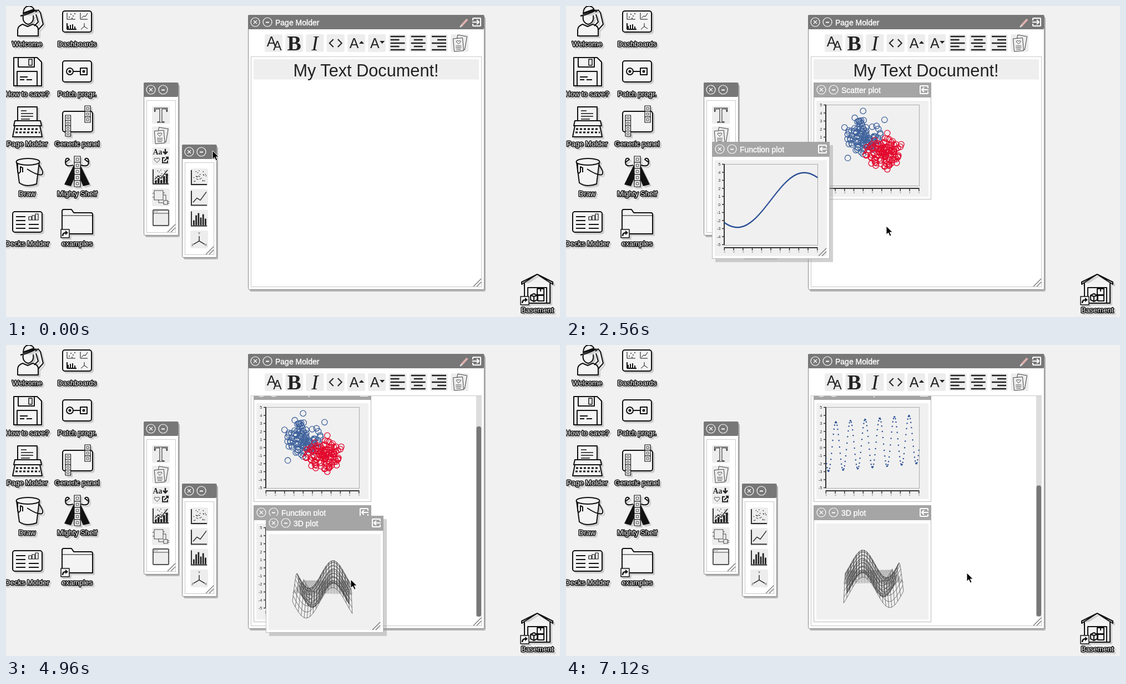
Write an HTML page that moves like this. It is 998 px wide and 561 px high and loops after 7200 ms.

```html
<!DOCTYPE html>
<html lang="en">
<head>
<meta charset="utf-8">
<title>Desktop</title>
<style>
html, body { margin: 0; width: 100%; height: 100%; overflow: hidden; background: #f1f1f1; }
svg { display: block; width: 998px; height: 561px; font-family: "Liberation Sans", Arial, sans-serif; }
.serif { font-family: "Liberation Serif", Times, serif; }
.desk { fill: none; stroke: #111; stroke-width: 2; stroke-linejoin: round; filter: drop-shadow(3px 3px 0 #ccc); }
.desk .w { fill: #f4f4f4; }
.desk .k { fill: #111; stroke: none; }
.label { font-size: 13px; fill: #fff; stroke: #111; stroke-width: 3px; stroke-linejoin: round; paint-order: stroke; text-anchor: middle; filter: drop-shadow(3px 3px 0 #d2d2d2); }
.title { font-size: 14px; fill: #fff; stroke: #fff; stroke-width: .35px; }
.ic { fill: none; stroke: #222; stroke-width: 1.4; }
.ic .k { fill: #222; stroke: none; }
.ic .t { stroke-width: .8; }
.btn { fill: none; stroke: #fff; stroke-width: 1.2; }
</style>
</head>
<body>
<svg id="stage" viewBox="0 0 998 561"></svg>
<script>
const LOOP = 7200, STEP = 80;
const $ = id => document.getElementById(id);
const range = (n, f) => Array.from({ length: n }, (_, i) => f(i)).join('');
const rect = (x, y, w, h, a = '') => `<rect x="${x}" y="${y}" width="${w}" height="${h}" ${a}/>`;
const path = (d, a = '') => `<path d="${d}" ${a}/>`;
const circle = (x, y, r, a = '') => `<circle cx="${x}" cy="${y}" r="${r}" ${a}/>`;
const text = (x, y, s, a = '') => `<text x="${x}" y="${y}" ${a}>${s}</text>`;
const at = (x, y, s, a = '') => `<g transform="translate(${x} ${y})" ${a}>${s}</g>`;

function random(seed) {
  return () => {
    seed = seed + 0x6D2B79F5 | 0;
    let v = Math.imul(seed ^ seed >>> 15, 1 | seed);
    v = v + Math.imul(v ^ v >>> 7, 61 | v) ^ v;
    return ((v ^ v >>> 14) >>> 0) / 4294967296;
  };
}

/* ---------- desktop icons ---------- */
const badge = (x, y) => rect(x, y, 15, 15, 'class="w" stroke-width="1.5"') +
  path(`M${x + 3} ${y + 12}q0-6 6-6`, 'stroke-width="2.4"') +
  path(`M${x + 8} ${y + 2}l5 4-5 4z`, 'class="k"');
const strip = (x, y, n, s) => range(n, i => rect(x, y + i * s, s, s, 'class="w" stroke-width="1.2"') +
  rect(x + s * .3, y + i * s + s * .3, s * .4, s * .4, 'stroke-width=".8"'));
const screen = (x, y, w, h) => rect(x, y, w, h, 'class="w" rx="4"');

const desktop = [
  [38, 73, 'Welcome', path('M21 54V44q0-8 9-11l9 4 9-4q10 2 10 10v11z', 'class="w"') +
    path('M31 18q-2 12 9 15 11-3 9-16', 'class="w"') +
    path('M31 14Q31 2 40 0q9 0 11 8z', 'class="w"') + path('M26 18Q40 15 55 7M31 13l20-7', 'stroke-width="2.500"') +
    path('M53 11l5-4 4 5 5 21-9 10M54 15l4 14-7 7')],
  [128, 73, 'Dashboards', screen(102, 9, 52, 38) + path('M112 42v-6M116 42V34M120 42v-9M124 42v-5M110 42h17M110 31v11', 'stroke-width="2"') +
    path('M134 12v12h13M136 22l4-4 3 1 4-6M141 31v6l-6 5M141 37l6 4M110 12v12h15', 'stroke-width="1"') +
    [[114, 20], [117, 15], [121, 18], [124, 14], [119, 22]].map(p => circle(...p, .9, 'class="k"')).join('')],
  [38, 163, 'How to save?', path('M14 93h42l8 8v43H14z', 'class="w"') + rect(22, 93, 29, 17) +
    rect(41, 96, 6, 11, 'stroke-width="1.5"') + rect(20, 118, 36, 26) + path('M25 128h14M25 133h8M37 133h10')],
  [128, 163, 'Patch progr.', screen(102, 99, 52, 38) + circle(115, 118, 6) + circle(115, 118, 1.5) + path('M121 118h13') + rect(134, 112, 12, 12) + circle(140, 118, 1.5)],
  [38, 253, 'Page Molder', rect(21, 182, 35, 27, 'class="w"') + path('M27 189h10M27 194h22M27 199h22M27 204h16', 'stroke-width="1.5"') +
    path('M16 207h46l2 9H14zM16 216h45l4 20H12z', 'class="w"') + path('M18 222h42M17 228h44', 'stroke-dasharray="4 3" stroke-width="3"')],
  [128, 253, 'Generic panel', screen(102, 190, 54, 37) + strip(107, 197, 4, 9.5) + strip(142, 180, 3, 10)],
  [38, 343, 'Draw', path('M19 281l5 38q13 9 31 2l5-40', 'class="w"') + '<ellipse cx="39.500" cy="281" rx="21" ry="6" class="w"/>' +
    path('M21 284v15q2 5 5 0v-9l4 2v8') + path('M59 286q10 14 6 18-7 3-27-10')],
  [128, 343, 'Mighty Shelf', path('M122 287l-17 35 12 3 11-26 11 26 12-3-17-35z', 'class="k"') +
    path('M121 287q-14 4-14-5l7-5q-2-4-6-1-2 6 0 9M135 287q14 4 14-5l-7-5q2-4 6-1 2 6 0 9') + strip(123, 271, 5, 11)],
  [38, 433, 'Decks Molder', screen(12, 371, 53, 37) + path('M18 380h17M18 387h17M18 394h17M18 401h17M41 394h18M41 401h18', 'stroke-width="1.800"') +
    rect(41, 380, 5, 6, 'stroke-width="1.2"') + rect(47, 378, 5, 8, 'stroke-width="1.2"') + rect(53, 375, 5, 11, 'stroke-width="1.2"')],
  [128, 433, 'examples', path('M101 411V370q0-3 3-3h14l4 6h31q3 0 3 3v35z', 'class="w"') + path('M101 378h55', 'stroke-width="1"') + badge(99, 403)],
  [957, 553, 'Basement', path('M934 500v36h46v-36', 'class="w"') + path('M929 502l28-18 28 18v-4l-28-14-28 14z', 'class="w"') +
    path('M940 536v-28h34v28') + rect(957, 510, 12, 11) + path('M963 510v5M945 522l6-3 6 3v8l-6 3-6-3zM951 533v-9l6-2M951 524l-6-2') + rect(958, 522, 11, 10) + badge(927, 524)]
];

/* ---------- windows ---------- */
const buttons = (x, y) => at(x, y, circle(13, 13, 8) + path('M10 10l6 6M16 10l-6 6') + circle(35, 13, 8) + path('M32 13.500h6', 'stroke-width="2"'), 'class="btn"');
const grip = (x, y) => path(`M${x - 15} ${y}l14-14M${x - 9} ${y}l8-8`, 'stroke="#777" stroke-width="1.4"');
const frame = (x, y, w, h, top) =>
  rect(x + 3, y + 4, w, h, 'rx="3" fill="#b4b4b4"') +
  rect(x + .5, y + .5, w, h, 'rx="2" fill="#fff" stroke="#888"') +
  rect(x, y, w, 26, 'rx="2" fill="#777"') + buttons(x, y) +
  rect(x + 5.5, y + top + .5, w - 10, h - top - 5, 'fill="none" stroke="#c9c9c9"') + grip(x + w - 4, y + h - 5);

const heart = (x, y, s) => path(`M${x} ${y + 4 * s}l${-4 * s} ${-4 * s}q${-s} ${-4 * s} ${4 * s} ${-2 * s}q${5 * s} ${-2 * s} ${4 * s} ${2 * s}z`, 'class="t"');
const cards = rect(-6, -14, 17, 24, 'class="t" transform="rotate(10)"') + rect(-11, -9, 17, 23, 'class="t" fill="#eee" transform="rotate(-5)"') +
  heart(-2, -2, .9) + path('M-7 5h10M-7 8h10M-6 11h8', 'class="t"');
const axes = path('M-14-13V13H14', 'stroke-width="1.800"');
const dots = (() => {
  const r = random(4);
  return range(24, () => circle((r() * 24 - 11).toFixed(1), (r() * 20 - 12).toFixed(1), .8, 'class="k"'));
})();
const bars = (list, w) => list.map((h, i) => rect(-11 + i * w, 12 - h, w - 1.4, h, 'class="k"')).join('');
const serif = (s, size, x, y, a = '') => text(x, y, s, `class="serif k" font-size="${size}" text-anchor="middle" ${a}`);
const sans = (s, size, x, y) => text(x, y, s, `class="k" font-size="${size}" text-anchor="middle"`);
const align = shift => path([13, 8, 13, 8, 13].map((w, i) => {
  const x = shift * (13 - w);
  return `M${x - w} ${i * 6 - 12}h${2 * w}`;
}).join(''), 'stroke-width="2.4"');

const tools = [
  text(0, 13, 'T', 'class="serif" font-size="40" text-anchor="middle" fill="#fff" stroke-width="1.1"'),
  cards,
  serif('Aa', 14, -6, -3, 'font-weight="bold"') + path('M8-13v7M4-8l4 4 4-4', 'stroke-width="2.4"') + heart(-7, 7, 1.2) +
    path('M7 3H3v9h9V8M6 9l7-7M9 2h4v4', 'stroke-width="2"'),
  axes + bars([5, 9, 6, 13, 17], 5) + path('M-11 5l6-6 5 4 12-15') + dots,
  rect(-12, -12, 16, 17, 'class="t"') + rect(5, 6, 7, 7, 'class="t"') + path('M-4 5v5H5M4-4h5v10M-15-7h3M-15 0h3M4-8h3M12 8h3M12 11h3', 'class="t"'),
  rect(-14, -14, 28, 28, 'rx="1"') + path('M-14-8H14M-12-11h2M-8-11h2', 'class="t"')
];
const charts = [
  axes + dots,
  axes + path('M-11 8l7-8 6 4 11-15'),
  axes + bars([9, 18, 22, 14, 20, 12], 4.2),
  path('M0-6V3L-10 9M0 3L10 9') + sans('Y', 6, 0, -9) + sans('Z', 6, -12, 12) + sans('X', 6, 12, 12)
];
const styles = [
  sans('A', 25, -4, 6) + sans('A', 23, 7, 13),
  serif('B', 38, 0, 13, 'font-weight="bold"'),
  serif('I', 37, 0, 13, 'font-style="italic"'),
  path('M-4-7l-7 7 7 7M4-7l7 7-7 7', 'stroke-width="2"'),
  sans('A', 25, -4, 9) + path('M5 1l4.500-5 4.500 5z', 'class="k"'),
  sans('A', 25, -4, 9) + path('M5-4l4.500 5 4.500-5z', 'class="k"'),
  align(-1), align(0), align(1), cards
];
const tool = (x, y, s) => at(x, y, rect(-16, -16, 32, 32, 'rx="3" fill="#ededed" stroke="none"') + s, 'class="ic"');
const port = (x, y, dir) => at(x, y, path('M-7-3v-3q0-1 1-1H6q1 0 1 1V6q0 1-1 1H-6q-1 0-1-1V3', dir < 0 ? 'transform="scale(-1 1)"' : '') +
  path('M-8 0H3M0-4l4 4-4 4', dir < 0 ? 'transform="scale(-1 1)"' : ''), 'fill="none" stroke="#fff" stroke-width="2"');

/* ---------- plots: 212 x 211, origin at (106, 113), one unit is 16.75 x 14.5 ---------- */
const UX = 16.75, UY = 14.5, CX = 106, CY = 113;
const plotAxes = rect(22.5, 40.5, 168, 146, 'fill="none" stroke="#aaa"') +
  path('M22 40V186M22 191H190', 'stroke="#333" stroke-width="2"') +
  range(11, i => {
    const y = 40.5 + i * UY, x = 22.3 + i * UX;
    return path(`M18 ${y}h5M${x} 190v6`, 'stroke="#333" stroke-width="1.500"') +
      text(15.5, y + 2.5, 5 - i, 'font-size="7.500" text-anchor="end" fill="#333"') +
      text(x, 200, i - 5, 'font-size="4" text-anchor="middle" fill="#555"');
  });

const plotWindow = (i, title, body) =>
  `<g id="wrap${i}"><g id="plot${i}">` +
  `<g id="deco${i}">` + rect(6, 6, 212, 211, 'fill="#999" fill-opacity=".45"') + '</g>' +
  rect(.5, .5, 211, 210, 'fill="#fff" stroke="#bbb"') + rect(5, 33, 202, 173, 'fill="#f0f0f0"') +
  rect(0, 0, 212, 27, 'fill="#a5a5a5"') + buttons(1, 0) + text(50, 19, title, 'class="title"') + port(199, 13, -1) +
  body + `<g id="grip${i}">${grip(207, 206)}</g></g></g>`;

// One cloud of rings as a path; extra points are given in plot units.
function cloud(seed, mx, my, sx, sy, extra) {
  const r = random(seed), pts = extra.slice();
  while (pts.length < 110) {
    const m = Math.min(2.1, Math.sqrt(-2 * Math.log(r() + 1e-6))), a = r() * 2 * Math.PI;
    pts.push([mx + sx * m * Math.cos(a), my + sy * m * Math.sin(a)]);
  }
  return pts.map(([x, y]) => `M${(CX + x * UX - 5.2).toFixed(1)} ${(CY - y * UY).toFixed(1)}a5.2 5.2 0 1 0 10.400 0a5.2 5.2 0 1 0-10.400 0`).join('');
}
const scatter = [
  [cloud(11, -.85, .95, 1, .75, [[-4.4, 1.2], [1.55, 3], [-1.3, 3], [-2.9, -1.3], [-3.5, .7]]),
   cloud(23, 1, -.9, .85, .85, [[3, .3], [2.9, -1.5], [-.35, -3], [.5, -3]])],
  [cloud(37, -.9, 1, .85, 1, [[-1, 4.25], [1.3, 3.15], [-1.9, 3.4], [-2.65, -1.6], [-3, 2.2]]),
   cloud(53, 1.05, -.9, .85, .85, [[3.1, .1], [3, -.2], [1.6, 1.5], [1.6, -3], [2.6, -2.2]])]
];

const heading = rect(446, 96, 406, 36.5, 'fill="#eee"') + text(648.5, 126.5, 'My Text Document!', 'font-size="30.700" text-anchor="middle" fill="#222"');
$('stage').innerHTML =
  '<defs><clipPath id="page">' + rect(442, 92, 415, 414) + '</clipPath><clipPath id="area">' + rect(22, 40, 168.5, 147) + '</clipPath></defs>' +
  rect(0, 0, 998, 561, 'fill="#f1f1f1"') +
  desktop.map(([x, y, name, art]) => `<g class="desk">${art}</g>` + text(x, y, name, 'class="label"')).join('') +
  frame(436, 16, 425, 495, 75) + text(485, 34.5, 'Page Molder', 'class="title"') +
  path('M820 36l11-12', 'stroke="#dfb0b0" stroke-width="4"') + path('M818 38l3-3', 'stroke="#eee" stroke-width="2"') + port(848, 29, 1) +
  styles.map((s, i) => tool(482 + i * 37.25, 67, s)).join('') +
  `<g clip-path="url(#page)"><g id="head">${heading}</g></g>` +
  `<g id="bar">${rect(847, 92, 10, 398, 'fill="#ddd"')}<rect id="thumb" x="847.500" width="8.500" rx="4" fill="#777"/></g>` +
  frame(248, 138, 62, 275, 32) + tools.map((s, i) => tool(279, 196.5 + i * 37.1, s)).join('') +
  frame(317, 250, 62, 203, 32) + charts.map((s, i) => tool(348, 309 + i * 37.3, s)).join('') +
  plotWindow(0, 'Scatter plot', plotAxes + '<g fill="none" stroke-width="1.300"><path id="blue" stroke="#40639d"/><path id="red" stroke="#e3082c"/></g>') +
  plotWindow(1, 'Function plot', plotAxes + '<path id="wave" clip-path="url(#area)" stroke="#2a4f94" stroke-width="2.500" stroke-linecap="round" fill="none"/>') +
  plotWindow(2, '3D plot', '<g fill="none"><path id="floor" stroke="#777" stroke-opacity=".55" stroke-width=".7"/><path id="mesh" stroke="#444" stroke-width=".7"/></g>') +
  '<path id="cursor" d="M0 0V15.500l3.600-3.400 2.700 6 2.700-1.200-2.700-5.800h5z" fill="#000" stroke="#fff" stroke-width="1"/>';

/* ---------- motion ---------- */
function track(keys, t) {
  let i = 0;
  while (i < keys.length - 2 && t >= keys[i + 1][0]) i++;
  const a = keys[i], b = keys[i + 1];
  const k = Math.max(0, Math.min(1, (t - a[0]) / (b[0] - a[0])));
  return a.slice(1).map((v, j) => v + (b[j + 1] - v) * k);
}
const pointer = [
  [0, 372, 261], [400, 348, 309], [720, 348, 309], [960, 546, 267], [1120, 560, 258], [1360, 560, 258],
  [2160, 348, 346], [2400, 348, 346], [2560, 577, 397], [2800, 589, 436], [3760, 589, 436],
  [4480, 348, 421], [4720, 348, 421], [4960, 621, 423], [5120, 640, 428], [5280, 640, 428], [5600, 722, 411]
];
const drags = [
  { dock: 1280, y: 138, keys: [[720, 263, 208], [960, 401, 179], [1120, 475, 157]] },
  { dock: 2960, y: 355, keys: [[2480, 263, 245], [2560, 263, 245], [2800, 504, 335]] },
  { dock: 5200, y: 572, keys: [[4720, 263, 320], [4960, 468, 308], [5120, 555, 327]] }
];
const scrolling = [[3360, 0], [3680, 66], [5360, 66], [5760, 283]];
const tuning = [[2560, .457, 0], [3520, 1.58, .35], [6160, 3.07, .65], [7120, 3.99, -1.57]];
const turning = [[4960, 4], [6160, 45], [7120, 86]];

function wave(t) {
  const [w, p] = track(tuning, t);
  return range(151, i => {
    const x = i / 15 - 5, y = 3.05 * Math.sin(w * x + p) + .1 * x + .55;
    return `M${(CX + x * UX).toFixed(2)} ${(CY - y * UY).toFixed(2)}h.01`;
  });
}

function grid(angle, height) {
  const c = Math.cos(angle), s = Math.sin(angle), n = 20;
  const point = (i, j) => {
    const u = i / n * 2 - 1, v = j / n * 2 - 1;
    const near = u * s + v * c, k = 1 / (1 - near * .15);
    const x = 105 + 46 * k * (u * c - v * s), y = 127 + k * (11 * near - height(u, v));
    return x.toFixed(1) + ' ' + y.toFixed(1);
  };
  return range(n + 1, i => range(n + 1, j => (j ? 'L' : 'M') + point(i, j)) + range(n + 1, j => (j ? 'L' : 'M') + point(j, i)));
}
const swell = x => 24 * Math.cos(3.5 * (x - .36));
const hills = (u, v) => swell(u) + swell(v);

const move = (id, x, y) => $(id).setAttribute('transform', `translate(${x.toFixed(1)} ${y.toFixed(1)})`);
const show = (id, on) => $(id).setAttribute('display', on ? 'inline' : 'none');

function draw(t) {
  const [scroll] = track(scrolling, t);
  drags.forEach((d, i) => {
    const docked = t >= d.dock;
    show('wrap' + i, t >= d.keys[0][0]);
    show('deco' + i, !docked);
    show('grip' + i, !docked);
    $('wrap' + i).setAttribute('clip-path', docked ? 'url(#page)' : 'none');
    const [x, y] = docked ? [446, d.y - scroll] : track(d.keys, t);
    move('plot' + i, x, y);
  });
  move('head', 0, -scroll);
  move('cursor', ...track(pointer, t));

  const content = t >= drags[2].dock ? 698 : 480;
  show('bar', t >= drags[1].dock);
  $('thumb').setAttribute('y', 92 + 398 * scroll / content);
  $('thumb').setAttribute('height', 398 * 414 / content);

  const phase = t % 1280, set = scatter[phase >= 400 && phase < 1040 ? 0 : 1];
  $('blue').setAttribute('d', set[0]);
  $('red').setAttribute('d', set[1]);
  $('wave').setAttribute('d', wave(t));
  if (t >= drags[2].keys[0][0]) {
    const angle = track(turning, t)[0] * Math.PI / 180;
    $('floor').setAttribute('d', grid(angle, () => 0));
    $('mesh').setAttribute('d', grid(angle, hills));
  }
}

const start = performance.now();
let last = -1;
function tick() {
  const t = Math.floor((performance.now() - start) % LOOP / STEP) * STEP;
  if (t !== last) draw(last = t);
  requestAnimationFrame(tick);
}
tick();
</script>
</body>
</html>
```
